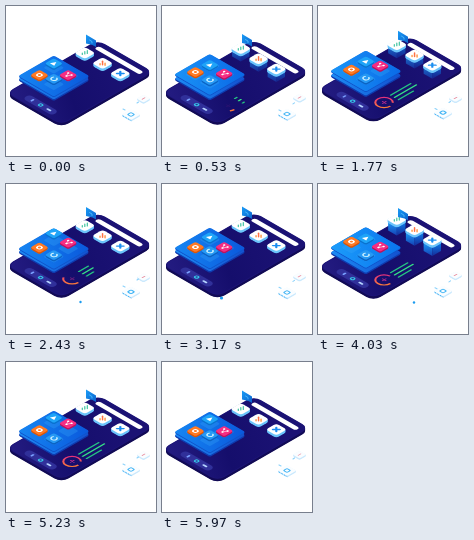
Recreate the animation shown at these times as an HTML page. Size 150 by 150 pixels, loop 6.01 s.

```html
<!DOCTYPE html>
<html lang="en">
<head>
<meta charset="utf-8">
<title>Isometric phone</title>
<style>
  html, body { margin: 0; width: 100%; height: 100%; overflow: hidden; background: #fff; }
  svg { display: block; width: 100vw; height: 100vh; }
</style>
</head>
<body>
<svg id="stage" viewBox="0 0 150 150">
  <defs>
    <linearGradient id="screen" x1="0" y1="0" x2="1" y2=".4">
      <stop offset="0" stop-color="#241c82"/><stop offset=".5" stop-color="#150e6c"/><stop offset="1" stop-color="#1b1274"/>
    </linearGradient>
    <linearGradient id="base" x1="0" y1="0" x2="1" y2="1">
      <stop offset="0" stop-color="#1c8cf4"/><stop offset="1" stop-color="#1250d0"/>
    </linearGradient>
    <linearGradient id="sheet" x1="0" y1="0" x2="1" y2="1">
      <stop offset="0" stop-color="#1686f2"/><stop offset="1" stop-color="#0a58dc"/>
    </linearGradient>
    <linearGradient id="bright" x1="0" y1="0" x2="1" y2="1">
      <stop offset="0" stop-color="#1c9dfa"/><stop offset="1" stop-color="#0a74ee"/>
    </linearGradient>
    <linearGradient id="pillar" x1="0" y1="0" x2="0" y2="1">
      <stop offset="0" stop-color="#1b9cf9"/><stop offset="1" stop-color="#1440b4"/>
    </linearGradient>
    <linearGradient id="pillarShade" x1="0" y1="0" x2="0" y2="1">
      <stop offset="0" stop-color="#0d80ec"/><stop offset="1" stop-color="#142c9a"/>
    </linearGradient>
    <linearGradient id="ring" x1="0" y1="0" x2="1" y2="1">
      <stop offset="0" stop-color="#e0218a"/><stop offset="1" stop-color="#ff8a2a"/>
    </linearGradient>
    <linearGradient id="flagFill" x1="0" y1="0" x2="1" y2="1">
      <stop offset="0" stop-color="#1a9cf6"/><stop offset="1" stop-color="#0b62cd"/>
    </linearGradient>
  </defs>
</svg>
<script>
const LOOP = 6010, C = Math.cos(Math.PI / 6);
const stage = document.getElementById('stage');

function add(parent, tag, attrs = {}) {
  const node = document.createElementNS('http://www.w3.org/2000/svg', tag);
  for (const key in attrs) node.setAttribute(key, attrs[key]);
  parent.appendChild(node);
  return node;
}
const set = (node, key, value) => node.setAttribute(key, value);
const move = (node, x, y) => set(node, 'transform', `translate(${x} ${y})`);
const point = (u, v, h = 0) => [C * (u + v), 87 + (v - u) / 2 - h];

// Flat plane lying on the isometric ground, centred at x, y.
const plane = (parent, x = 0, y = 0) =>
  add(parent, 'g', { transform: `matrix(${C} -.5 ${C} .5 ${x} ${y})` });

function slab(parent, w, d, r, depth, side, top) {
  const box = { x: -w / 2, y: -d / 2, width: w, height: d, rx: r };
  for (let h = depth; h > 0; h -= .5) add(plane(parent, 0, h), 'rect', { ...box, fill: side });
  const face = plane(parent);
  add(face, 'rect', { ...box, fill: top });
  return face;
}
const path = (parent, d, color, width = 1) => add(parent, 'path', {
  d, fill: 'none', stroke: color, 'stroke-width': width, 'stroke-linecap': 'round', 'stroke-linejoin': 'round'
});
const dot = (parent, cx, cy, r, fill) => add(parent, 'circle', { cx, cy, r, fill });

// Phone
const device = add(stage, 'g');
const body = add(device, 'g');
move(body, ...point(53, 32));
slab(body, 106, 64, 8, 2.5, '#120b56', '#1c1478');
add(plane(body), 'rect', { x: -52, y: -31, width: 104, height: 62, rx: 7, fill: 'url(#screen)' });
const ground = plane(device, 0, 87);
path(ground, 'M98 9V56', '#fff', 5);
path(ground, 'M8 19V45', '#30309a', 8);
path(ground, 'M7 22.500h2', '#7aa0ff', 1.8);
add(ground, 'circle', { cx: 8, cy: 32, r: 1.6, fill: 'none', stroke: '#35c8e8', 'stroke-width': 1.2 });
path(ground, 'M8 40V43', '#b5d4ff', 2);

// Gauge and bars
const gauge = add(ground, 'circle', {
  cx: 24.8, cy: 51.5, r: 7.2, fill: 'none', stroke: 'url(#ring)', 'stroke-width': 1.7,
  pathLength: 100, transform: 'rotate(90 24.8 51.5)'
});
const hub = path(ground, 'M23 51.500h4M25 49.500v4', '#c8308f', 1.1);
const bars = [[48, 23], [52.5, 25], [57, 17]].map(([v, length], i) =>
  ({ v, length, node: path(ground, '', i === 1 ? '#35e287' : '#25c583', 1.5) }));

// White cards on pillars
const icons = [
  (face, node) => {
    path(node, 'M-2.500 1.500V0M0 1V-1.500M2.500 .5V-2.500', '#3fc4a0', 1.2);
  },
  (face, node) => {
    path(node, 'M-2.500 1.500V.5M2.500 2V0', '#ff9a4a', 1.5);
    path(node, 'M0 1.500V-2', '#ff7045', 1.5);
  },
  face => { path(face, 'M-2 -2L2 2M2 -2L-2 2', '#1a8df0', 1.8); }
];
const cards = icons.map((draw, i) => {
  const left = add(device, 'polygon', { fill: 'url(#pillar)' });
  const right = add(device, 'polygon', { fill: 'url(#pillarShade)' });
  const node = add(device, 'g');
  draw(slab(node, 12, 12, 3, 2.5, '#6cc4fb', '#fff'), node);
  return { u: 81.5, v: 9.5 + 20.5 * i, left, right, node };
});

// Stacked sheets with app tiles
const lower = add(device, 'g');
slab(lower, 41, 41, 2, 1.5, '#0f3aae', 'url(#base)');
const upper = add(device, 'g');
const sheet = slab(upper, 41, 41, 2, 1, '#0f55cc', 'url(#sheet)');
const glow = add(sheet, 'rect', { x: -20.5, y: -20.5, width: 41, height: 41, rx: 2, fill: 'url(#bright)' });
const layout = [
  { u: 8.3, v: -8.3, at: 2580, rise: 6.5, color: '#1fa4f8', side: '#0b73d0',
    icon: f => add(f, 'path', { d: 'M-2 -2.500L3 0L-2 2.500Z', fill: '#fff' }) },
  { u: -8.3, v: -8.3, at: 1080, rise: 5, color: '#ff7a24', side: '#d9560c',
    icon: f => add(f, 'circle', { r: 2, fill: 'none', stroke: '#fff', 'stroke-width': 1.4 }) },
  { u: 8.3, v: 8.3, at: 2130, rise: 7, color: '#f52d83', side: '#b9145f',
    icon: f => {
      path(f, 'M2 -2L-2 0L2 2', '#ffc4dc', .7);
      for (const [x, y] of [[2, -2], [-2, 0], [2, 2]]) dot(f, x, y, 1, '#fff');
    } },
  { u: -8.3, v: 8.3, at: 3050, rise: 4.5, color: '#2699f4', side: '#0d64c4',
    icon: f => path(f, 'M1.500 -2A2.500 2.500 0 1 0 2.500 1', '#c9efff', 1.3) }
];
for (const t of layout)
  add(sheet, 'rect', { x: t.u - 6, y: t.v - 6, width: 12, height: 12, rx: 1.5, fill: '#37a9f7', opacity: .3 });
const tiles = layout.map(t => {
  const node = add(upper, 'g');
  t.icon(slab(node, 10.5, 10.5, 2, 1.5, t.side, t.color));
  return { ...t, node };
});

// Upright flag
const flag = add(device, 'g');
add(flag, 'path', { d: 'M80 28.500L90 34.500V41L86.500 39L80 37.500Z', fill: 'url(#flagFill)' });
path(flag, 'M83.500 34l2.500 1.500v1.500', '#55c3ff', .8);

// Pale pieces floating beside the phone
const pieces = [[125, 108.5, 11], [137.5, 93, 8]].map(([x, y, size], i) => {
  const node = add(stage, 'g');
  const face = slab(node, size, size, 1.5, 1.5, '#cbe9fd', '#fafdff');
  if (!i) {
    add(face, 'rect', { x: -2, y: -2, width: 4, height: 4, rx: 1, fill: 'none', stroke: '#43b5f5', 'stroke-width': 1.2 });
    path(node, 'M-8 1.500L0 6', '#46b4f6', 1).setAttribute('stroke-dasharray', '1 2');
  } else path(face, 'M-1.500 0h3', '#e88a9c', .9);
  return { x, y, node };
});
const specks = add(stage, 'g');
path(specks, 'M117 103l2 1M131 97l1.500 -1', '#8bd2fb', 1.1);

const sparks = [[74.5, 118, 2430, 1.2], [59.5, 114, 3170, 1.6], [96, 118.5, 4030, 1.2]]
  .map(([x, y, at, r]) => ({ at, y, node: dot(stage, x, y, r, '#1b9bef') }));

const smooth = (t, from, to) => {
  const p = Math.min(1, Math.max(0, (t - from) / (to - from)));
  return p * p * (3 - 2 * p);
};
const pulse = (t, a, b, c, d) => smooth(t, a, b) * (1 - smooth(t, c, d));
function bump(t, center, width, period) {
  const gap = ((t - center) % period + period * 1.5) % period - period / 2;
  return Math.abs(gap) < width ? (1 + Math.cos(Math.PI * gap / width)) / 2 : 0;
}

function render(time) {
  const phase = time / LOOP * 2 * Math.PI, half = LOOP / 2, t = time % half;
  move(device, 0, 3 * Math.cos(phase) - 3);

  const lift = pulse(t, 150, 850, 1450, 2250);
  for (const { u, v, left, right, node } of cards) {
    const h = 4 + 7 * lift, s = 5;
    move(node, ...point(u, v, h));
    const corner = (a, b, z) => point(u + a * s, v + b * s, z).join();
    const wall = (a, b, c, d) => [corner(a, b, h - 2), corner(c, d, h - 2), corner(c, d, 0), corner(a, b, 0)].join(' ');
    set(left, 'points', wall(-1, -1, -1, 1));
    set(right, 'points', wall(-1, 1, 1, 1));
    set(left, 'opacity', lift);
    set(right, 'opacity', lift);
  }

  move(lower, ...point(39.6, 15.6, 2));
  move(upper, ...point(39.6, 15.6, 5 + 2 * lift));
  set(glow, 'opacity', lift);
  for (const { u, v, at, rise, node } of tiles)
    move(node, C * (u + v), (v - u) / 2 - 1 - rise * bump(time, at, 850, half));

  const grow = pulse(t, 350, 1250, 2230, 2620);
  set(gauge, 'stroke-dasharray', `${88 * grow} 100`);
  set(gauge, 'opacity', grow > .01 ? 1 : 0);
  set(hub, 'opacity', grow);
  for (const { v, length, node } of bars) {
    set(node, 'd', `M36 ${v}h${length * grow}`);
    set(node, 'opacity', grow > .01 ? 1 : 0);
  }

  pieces.forEach(({ x, y, node }, i) => move(node, x, y - 1 + Math.cos(2 * phase + i)));
  move(specks, 0, Math.sin(2 * phase));
  for (const { at, y, node } of sparks) {
    set(node, 'cy', y - (time - at) / 200);
    set(node, 'opacity', bump(time, at, 400, LOOP));
  }
}

function tick(now) {
  render(now % LOOP);
  requestAnimationFrame(tick);
}
render(0);
requestAnimationFrame(tick);
</script>
</body>
</html>
```
